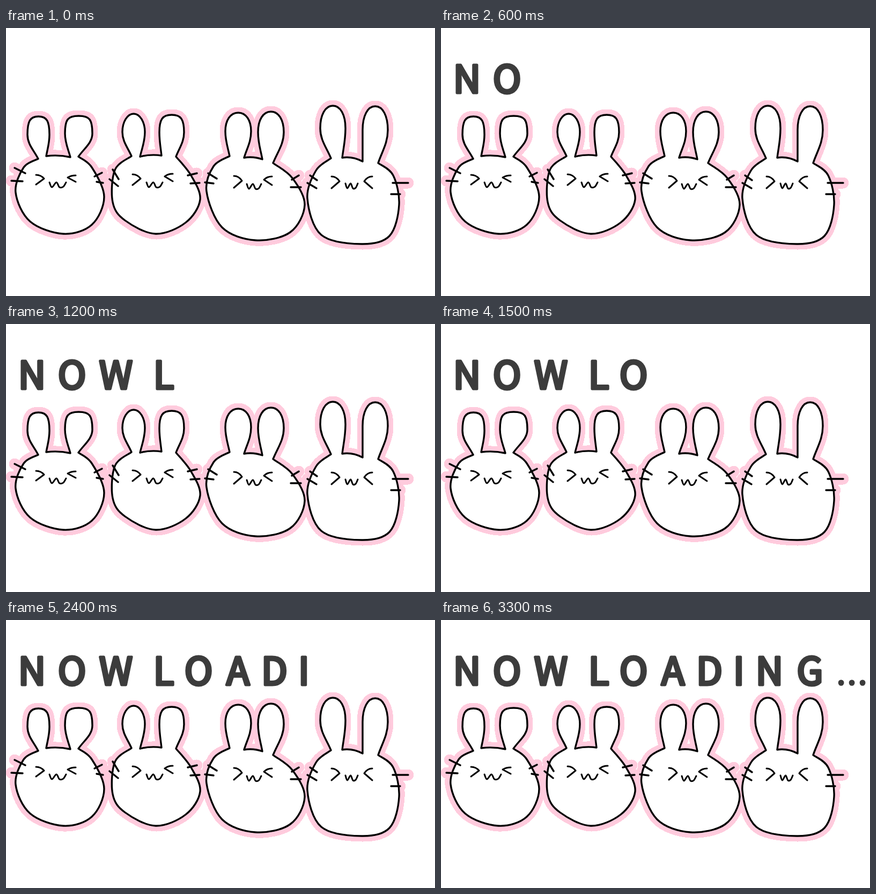
An HTML page that plays this animation: 800x500 px, repeating every 3.6 s.

```html
<!DOCTYPE html>
<html lang="en">
<head>
<meta charset="utf-8">
<title>Now loading</title>
<style>
  html, body { margin: 0; width: 100%; height: 100%; overflow: hidden; background: #fff; }
  svg { display: block; width: 100vw; height: 100vh; }
  path { stroke-linecap: round; stroke-linejoin: round; fill: none; }
  #halos path { stroke: #ffcbdd; stroke-width: 21; shape-rendering: crispEdges; }
  #ink path { stroke: #000; stroke-width: 3.4; }
  #ink .body { fill: #fff; }
  #ink .face { stroke-width: 3; }
  text {
    font: 400 71px "Noto Sans CJK JP", "Noto Sans CJK SC", "Noto Sans", sans-serif;
    text-anchor: middle; fill: #3c3c3c; stroke: #3c3c3c; stroke-width: 5; stroke-linejoin: round;
  }
  .dots { stroke-width: 1.5; }
</style>
</head>
<body>
<svg viewBox="0 0 800 500">
  <g id="halos"></g>
  <g id="ink"></g>
  <g id="caption"></g>
</svg>
<script>
const STEP = 300, LOOP = 3600;

// ears: where they start and end on the head, their extent, and how square the tip is.
// head: key points clockwise from the right ear. eyes: tip x, middle y, half height.
// mouth: left x, top y, width.
const bunnies = [
  {
    ears: [
      { from: [60, 244], to: [75, 239], left: 40, right: 81, top: 165, square: .75 },
      { from: [120, 241], to: [135, 240], left: 110, right: 161, top: 164, square: .8 }
    ],
    head: "160,260 183,315 160,367 107,384 45,361 18,307 33,260",
    whiskers: "M16 261l20 10M10 285l21 1M165 277l14-7M169 287l12 2",
    eyes: [[71, 283, 9], [115, 281, 6]], mouth: [81, 288, 31]
  },
  {
    ears: [
      { from: [234, 239], to: [250, 240], left: 217, right: 259, top: 160, square: .55 },
      { from: [290, 238], to: [317, 240], left: 286, right: 332, top: 162, square: .75 }
    ],
    head: "345,275 362,320 335,363 279,384 222,359 199,325 203,265",
    whiskers: "M199 264l11 18M193 282l16 13M339 275l17-4M344 290l17-1",
    eyes: [[251, 283, 10], [296, 279, 7]], mouth: [262, 288, 30]
  },
  {
    ears: [
      { from: [417, 239], to: [444, 242], left: 409, right: 457, top: 158, square: .6 },
      { from: [478, 245], to: [498, 252], left: 470, right: 518, top: 156, square: .6 }
    ],
    head: "534,280 557,330 530,381 465,396 403,372 374,305 387,258",
    whiskers: "M377 271l16 10M371 288l16 2M533 283l13-8M531 297h19",
    eyes: [[440, 287, 11], [481, 285, 8]], mouth: [449, 291, 27]
  },
  {
    ears: [
      { from: [606, 243], to: [627, 242], left: 586, right: 633, top: 145, square: .6 },
      { from: [665, 249], to: [694, 252], left: 665, right: 712, top: 146, square: .6 }
    ],
    head: "722,275 733,330 715,388 663,403 588,386 562,318 578,266",
    whiskers: "M567 275l13 9M562 289l17 10M721 289h29M718 310h17",
    eyes: [[622, 288, 11], [668, 288, 11]], mouth: [633, 290, 23]
  }
];

// Letter and horizontal centre, in order of appearance.
const letters = [
  ["N", 48.5], ["O", 123], ["W", 205], ["L", 294], ["O", 359], ["A", 432.5],
  ["D", 500.5], ["I", 555.5], ["N", 612.5], ["G", 688], ["...", "746 766 786"]
];

function add(parent, tag, attributes) {
  const node = document.createElementNS("http://www.w3.org/2000/svg", tag);
  for (const name in attributes) node.setAttribute(name, attributes[name]);
  return document.getElementById(parent).appendChild(node);
}

const mix = (a, b, t) => a + (b - a) * t;

// Catmull-Rom spline through the points, written as cubic Béziers.
function spline(points) {
  const at = i => points[Math.max(0, Math.min(points.length - 1, i))];
  const handle = (i, sign) =>
    at(i).map((v, axis) => v + sign * (at(i + 1)[axis] - at(i - 1)[axis]) / 6);
  return points.slice(1).map((end, i) =>
    `C${handle(i, 1)} ${handle(i + 1, -1)} ${end}`).join("");
}

// A tapered stem up to the widest height, a rounded tip, and a stem back down.
function ear({ from, to, left, right, top, square }) {
  const wide = mix(top, from[1], .43), middle = (left + right) / 2;
  const shoulder = mix(wide, top, square);
  const stem = ([x, y], side) => [
    [mix(x, side, .4), mix(y, wide, .35)], [side, mix(wide, y, .4)]
  ];
  const [a, b] = stem(from, left), [d, c] = stem(to, right);
  return `C${a} ${b} ${left},${wide}` +
    `C${left},${shoulder} ${mix(middle, left, square)},${top} ${middle},${top}` +
    `C${mix(middle, right, square)},${top} ${right},${shoulder} ${right},${wide}` +
    `C${c} ${d} ${to}`;
}

function outline({ ears: [first, second], head }) {
  const [x1, y1] = first.to, [x2, y2] = second.from;
  const crown = `Q${(x1 + x2) / 2},${Math.min(y1, y2) - 3} ${second.from}`;
  const headPoints = head.split(" ").map(point => point.split(",").map(Number));
  return `M${first.from}` + ear(first) + crown + ear(second) +
    spline([second.to, ...headPoints, first.from]) + "Z";
}

// side is 1 for ">" and -1 for "<".
function eye([x, y, half], side) {
  const back = x - 15 * side;
  return `M${back},${y - half}Q${x - 6 * side},${y - half} ${x},${y - 2}L${back},${y + half}`;
}

function mouth([x, y, width]) {
  const wave = [[0, 0], [.15, 1], [.42, 0], [.6, 1], [.83, .9], [1, 0]];
  const points = wave.map(([u, v]) => [x + u * width, y + v * 9]);
  return `M${points[0]}` + spline(points);
}

for (const bunny of bunnies) {
  const body = outline(bunny), whiskers = bunny.whiskers;
  const [leftEye, rightEye] = bunny.eyes;
  add("halos", "path", { d: body + whiskers });
  add("ink", "path", { d: body, class: "body" });
  add("ink", "path", { d: whiskers });
  add("ink", "path", { d: eye(leftEye, 1) + eye(rightEye, -1) + mouth(bunny.mouth), class: "face" });
}

const glyphs = letters.map(([letter, x]) => {
  const glyph = add("caption", "text", { x, y: 120.5, class: letter === "..." ? "dots" : "letter" });
  glyph.textContent = letter;
  return glyph;
});

function draw(now) {
  const shown = Math.floor((now % LOOP) / STEP);
  glyphs.forEach((glyph, i) => glyph.setAttribute("visibility", i < shown ? "visible" : "hidden"));
  requestAnimationFrame(draw);
}
draw(performance.now());
</script>
</body>
</html>
```
